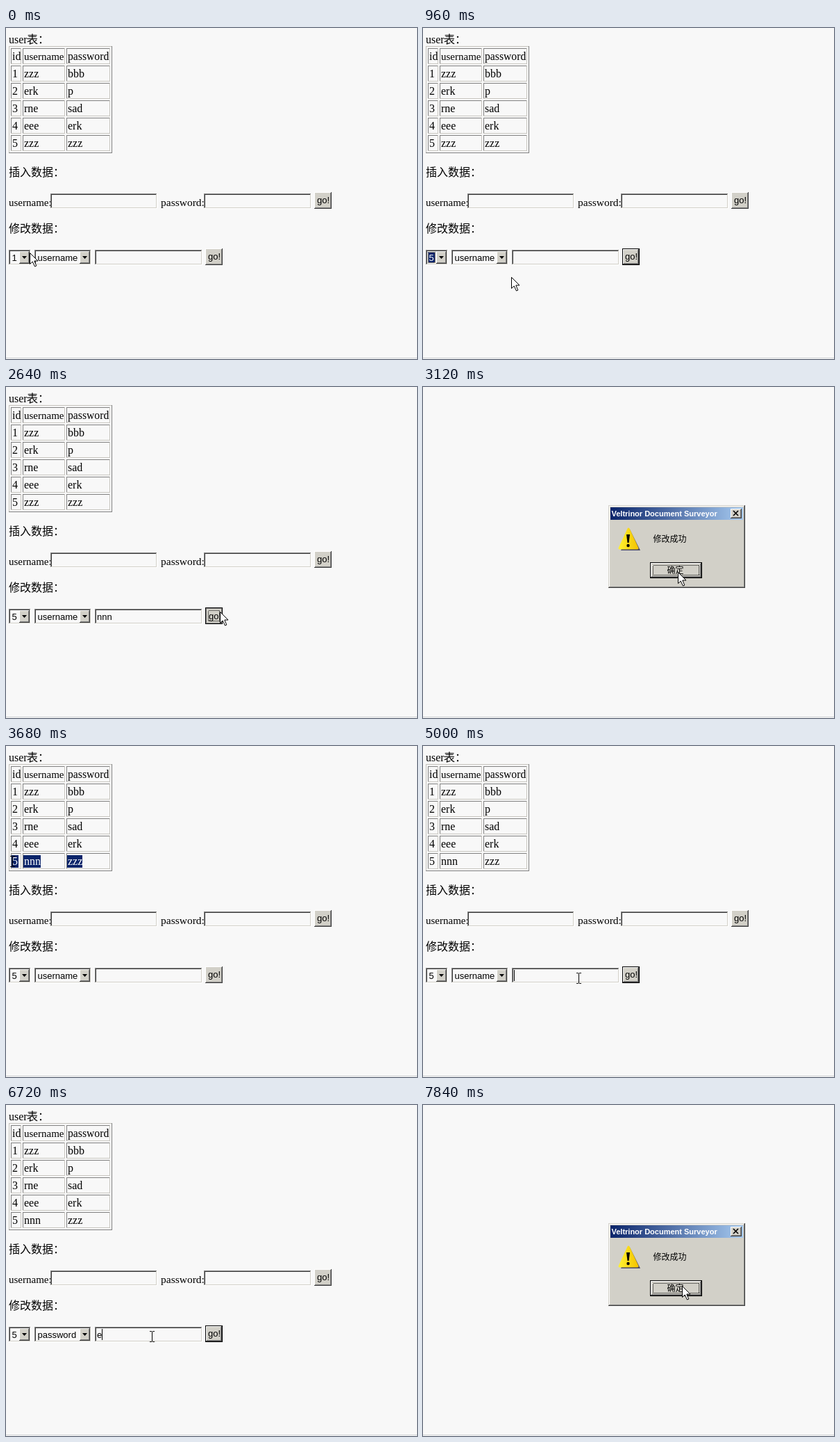
Recreate the animation shown at these times as an HTML page. Size 592 by 476 pixels, loop 8000 ms.

```html
<!DOCTYPE html>
<html lang="zh-CN">
<head>
<meta charset="utf-8">
<style>
  html, body { margin: 0; width: 100%; height: 100%; overflow: hidden; background: #f8f8f8; }
  svg { display: block; }
  rect { shape-rendering: crispEdges; }
  text { white-space: pre; }
  .serif { font-family: "Liberation Serif", serif; }
  .sans { font-family: "Liberation Sans", sans-serif; }
  .cjk { font-family: "Noto Sans CJK SC", "Noto Sans CJK", sans-serif; }
</style>
</head>
<body>
<svg id="stage" width="592" height="476" viewBox="0 0 592 476"></svg>
<script>
const LOOP = 8000, STEP = 40;
const PAPER = '#f8f8f8', FACE = '#d2d0c8', DARK = '#808080', DEEP = '#404040', NAVY = '#0a246a';
const stage = document.getElementById('stage');

// Pointer moves: start, end, x, y; it rests in between
const MOVES = [
  [80, 240, 27, 329], [320, 700, 14, 411], [840, 960, 127, 358], [960, 1500, 222, 334],
  [2100, 2360, 447, 270], [2400, 2600, 308, 323], [2760, 3160, 373, 260],
  [3440, 3520, 140, 166], [3520, 3680, 9, 166], [4120, 4760, 224, 334],
  [5000, 5160, 351, 338], [5160, 5360, 92, 330], [5560, 5840, 96, 362], [6000, 6280, 200, 334],
  [6560, 6700, 210, 333], [6840, 7000, 289, 330], [7160, 7300, 298, 330], [7560, 7840, 373, 260]
];

const within = (t, ...spans) => spans.some(([a, b]) => t >= a && t < b);
const countPast = (t, times) => times.filter(s => t >= s).length;

function pointerAt(t) {
  let x = 34, y = 323;
  for (const [from, to, nx, ny] of MOVES) {
    const k = Math.min(1, Math.max(0, (t - from) / (to - from)));
    x += (nx - x) * k;
    y += (ny - y) * k;
  }
  return [Math.round(x), Math.round(y)];
}

const rect = (x, y, w, h, fill) => `<rect x="${x}" y="${y}" width="${w}" height="${h}" fill="${fill}"/>`;
const text = (x, y, str, kind, size, fill = '#000', extra = '') =>
  `<text x="${x}" y="${y}" class="${kind}" font-size="${size}" fill="${fill}" ${extra}>${str}</text>`;
const dotted = (x, y, w, h, color) =>
  `<rect x="${x + .5}" y="${y + .5}" width="${w - 1}" height="${h - 1}" fill="none" stroke="${color}" stroke-dasharray="1 1"/>`;

// One-pixel frame with separate light and shadow sides
const edge = (x, y, w, h, lit, shade, fill) =>
  rect(x, y, w, h, shade) + rect(x, y, w - 1, h - 1, lit) + rect(x + 1, y + 1, w - 2, h - 2, fill);
const bevel = (x, y, w, h, [a, b, c, d], fill) =>
  edge(x, y, w, h, a, b, fill) + edge(x + 1, y + 1, w - 2, h - 2, c, d, fill);
const raised = (x, y, w, h) => bevel(x, y, w, h, ['#fff', DEEP, FACE, DARK], FACE);
const field = (x, y, w, h) => bevel(x, y, w, h, [DARK, '#fff', DEEP, FACE], PAPER);

function goButton(x, y, state) {
  const pressed = state === 'pressed';
  let out = raised(x, y, 25, 24);
  if (state) out = rect(x, y, 25, 24, '#000') + raised(x + 1, y + 1, 23, 22);
  if (pressed) out = rect(x, y, 25, 24, '#000') + edge(x + 1, y + 1, 23, 22, DARK, DARK, FACE) + dotted(x + 4, y + 4, 17, 16, '#000');
  const d = pressed ? 1 : 0;
  return out + text(x + 4 + d, y + 16 + d, 'go!', 'sans', 13);
}

function dropdown(x, w, value, focused) {
  let out = field(x, 319, w, 22) + raised(x + w - 17, 321, 15, 18);
  out += `<path d="M${x + w - 13} 328h7l-3.5 4z"/>`;
  if (focused) out += rect(x + 3, 322, w - 21, 16, NAVY) + dotted(x + 3, 322, w - 21, 16, '#e8c878');
  return out + text(x + 4.5, 335, value, 'sans', 13, focused ? '#fff' : '#000');
}

function optionList(x, w, options, py) {
  const hot = Math.min(options.length - 1, Math.max(0, Math.floor((py - 342) / 16)));
  return edge(x, 341, w, options.length * 16 + 2, '#000', '#000', PAPER) + options.map((o, i) => {
    const y = 342 + i * 16, on = i === hot;
    return (on ? rect(x + 1, y, w - 2, 16, NAVY) : '') + text(x + 4, y + 13, o, 'sans', 13, on ? '#fff' : '#000');
  }).join('');
}

function table(t, px) {
  const rows = [
    'id username password', '1 zzz bbb', '2 erk p', '3 rne sad', '4 eee erk',
    t < 2720 ? '5 zzz zzz' : '5 nnn zzz'
  ];
  const cols = [[7, 15, 9], [24, 61, 24], [87, 63, 21]];
  const sizes = { username: 15, password: 15.7 };
  const selecting = within(t, [3520, 4800]);
  const reach = t < 3700 ? px : 9;
  let out = edge(4, 26, 149, 154, '#c4c2bc', DARK, PAPER);
  rows.forEach((row, r) => row.split(' ').forEach((str, c) => {
    const [x, w, mark] = cols[c], y = 29 + r * 25;
    const on = selecting && r === 5 && reach < x + 2 + mark / 2;
    out += edge(x, y, w, 23, DARK, '#c8c6c0', PAPER);
    if (on) out += rect(x + 1, y + 3, mark + 1, 18, NAVY);
    out += text(x + 2, y + 17, str, 'serif', sizes[str] || 16, on ? '#fff' : '#000');
  }));
  return out;
}

function page(t, px, py) {
  const typed = t < 3000 ? 'n'.repeat(countPast(t, [1880, 1960, 2040])) : 'e'.repeat(countPast(t, [6720, 6800, 7160]));
  const caret = within(t, [1400, 2600], [4800, 5640], [6480, 7480]);
  const pressed = within(t, [2600, 2720], [7480, 7560]);
  const active = within(t, [240, 2600], [4800, 7480]);

  let out = text(4, 22, 'user', 'serif', 16) + text(30, 22, '表：', 'cjk', 16) + table(t, px);
  out += text(4, 213, '插入数据：', 'cjk', 16) + text(4, 294, '修改数据：', 'cjk', 16);
  out += text(4, 256, 'username:', 'serif', 15) + field(64, 238, 154, 22);
  out += text(223, 256, 'password:', 'serif', 15.5) + field(285, 238, 155, 22) + goButton(444, 236);

  out += dropdown(4, 32, t < 880 ? '1' : '5', within(t, [240, 1400]));
  out += dropdown(41, 82, t < 5960 ? 'username' : 'password', within(t, [5640, 6480]));
  out += field(128, 319, 155, 22) + text(131, 335, typed, 'sans', 13);
  if (caret) out += rect(131 + Math.floor(typed.length * 7.23), 322, 1, 16, '#000');
  out += goButton(287, 317, pressed ? 'pressed' : active && 'active');

  if (within(t, [280, 880])) out += optionList(4, 32, [...'12345'], py);
  if (within(t, [5640, 5960])) out += optionList(41, 82, ['username', 'password'], py);
  return out;
}

function dialog(pressed) {
  const d = pressed ? 1 : 0;
  return bevel(267, 170, 197, 119, [FACE, DEEP, '#fff', DARK], FACE) +
    rect(270, 173, 191, 18, 'url(#bar)') +
    text(271.5, 186, 'Veltrinor Document Surveyor', 'sans', 11, '#fff', 'font-weight="bold"') +
    raised(443, 175, 16, 14) +
    '<path d="M447 178l7 7m0-7l-7 7" stroke="#000" stroke-width="1.6"/>' +
    '<path d="M298 205L313 235H285Z" fill="#484868"/>' +
    '<path d="M296 204L309 232H283Z" fill="url(#warn)" stroke="url(#warn)" stroke-width="3" stroke-linejoin="round"/>' +
    '<path d="M293 212h5l-1.500 12h-2z"/><circle cx="295.500" cy="228" r="2.200"/>' +
    text(331.5, 223, '修改成功', 'cjk', 12) +
    rect(327, 252, 75, 23, '#000') +
    (pressed ? edge(328, 253, 73, 21, DARK, DARK, FACE) : raised(328, 253, 73, 21)) +
    dotted(331, 256, 67, 15, '#000') +
    text(351.5 + d, 267.5 + d, '确定', 'cjk', 12);
}

function pointer(x, y, onPage) {
  const overText = onPage && ((x > 129 && x < 282 && y > 319 && y < 341) || (x < 150 && y > 156 && y < 176));
  return overText
    ? `<path transform="translate(${x} ${y})" d="M-3 -7.500h3m1 0h3M-3 7.500h3m1 0h3M.5 -7v14" stroke="#000" fill="none" shape-rendering="crispEdges"/>`
    : `<path transform="translate(${x + .5} ${y + .5})" d="M0 0V16L3.700 12.500L7 19.500L9.300 18.500L6.300 11.500H11.500Z" fill="#fff" stroke="#000"/>`;
}

const defs = `<defs>
  <linearGradient id="bar"><stop stop-color="${NAVY}"/><stop offset="1" stop-color="#a6caf0"/></linearGradient>
  <linearGradient id="warn"><stop stop-color="#fff030"/><stop offset="1" stop-color="#f4c400"/></linearGradient>
</defs>`;

function draw(t) {
  const [px, py] = pointerAt(t);
  const onPage = !within(t, [2720, 3480], [7560, LOOP]);
  let out = defs + rect(0, 0, 592, 476, PAPER) + rect(0, 474, 592, 1, '#d0d2d4');
  if (onPage) out += page(t, px, py);
  if (within(t, [2800, 3320], [7640, LOOP])) out += dialog(within(t, [3240, 3320]));
  stage.innerHTML = out + pointer(px, py, onPage);
}

const start = performance.now();
let shown = -1;
function tick() {
  const t = Math.floor(((performance.now() - start) % LOOP) / STEP) * STEP;
  if (t !== shown) draw(shown = t);
  requestAnimationFrame(tick);
}
tick();
</script>
</body>
</html>
```
